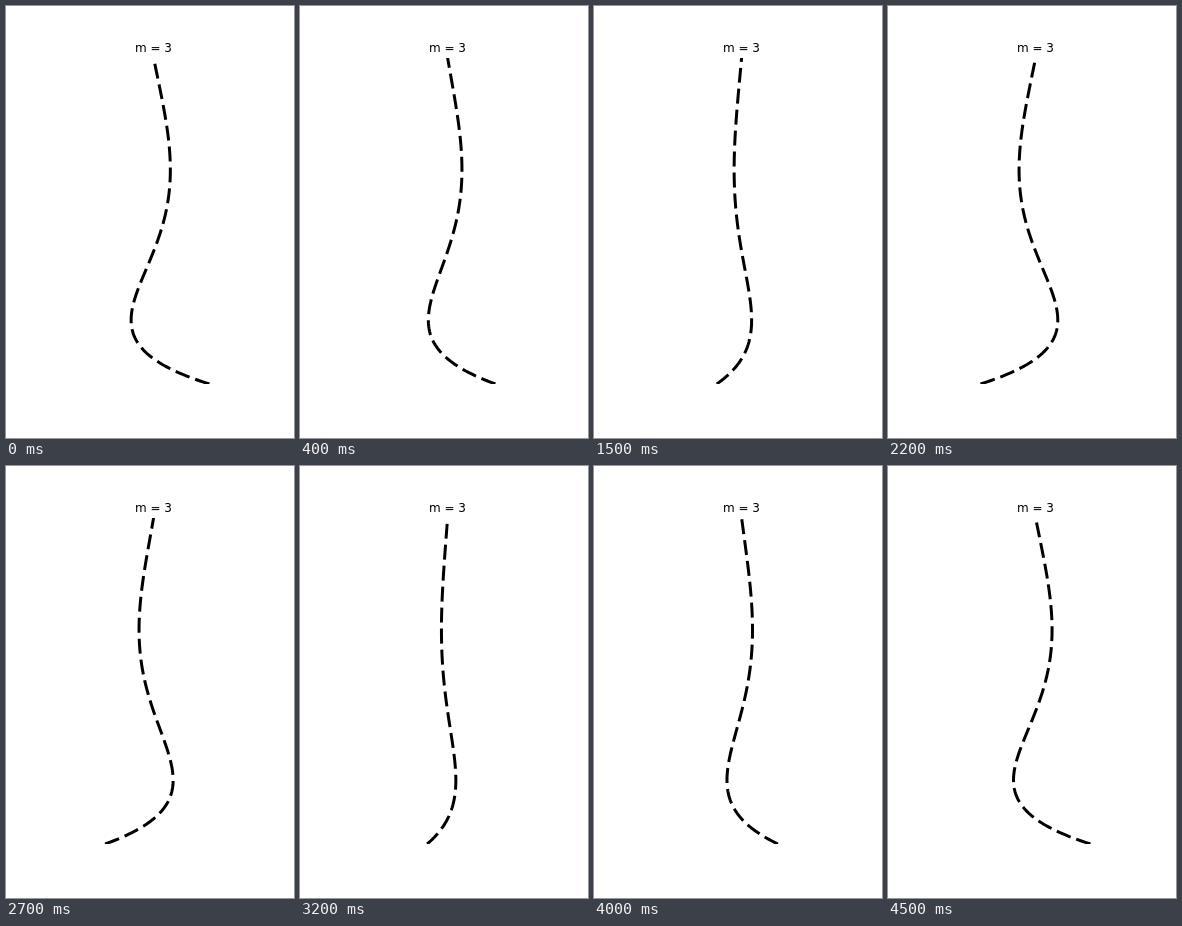
These frames come from a looping animation (288 px wide and 432 px high, 4600 ms). An HTML page:

```html
<!DOCTYPE html>
<html lang="en">
<head>
<meta charset="utf-8">
<title>Hanging chain, mode 3</title>
<style>
html, body { margin: 0; width: 100%; height: 100%; overflow: hidden; background: #fff; }
svg { display: block; }
text { font: 12px "DejaVu Sans", sans-serif; }
</style>
</head>
<body>
<svg width="288" height="432" viewBox="0 0 288 432">
  <clipPath id="axes"><rect x="36" y="52" width="223" height="326"/></clipPath>
  <text x="129" y="46">m = 3</text>
  <g clip-path="url(#axes)">
    <path id="chain" fill="none" stroke="#000" stroke-width="3" stroke-dasharray="15 6" stroke-linejoin="round"/>
  </g>
</svg>
<script>
const LOOP = 4600, STEP = 100, POINTS = 200;
const CENTER = 147.6, AMPLITUDE = 55.8, BOTTOM = 378, LENGTH = 326.16;
const ROOT = 8.653728;                      // third zero of J0
const OMEGA = ROOT / 2 * Math.sqrt(9.81);   // chain of 1 m
const SLOWDOWN = 10;

// Bessel function J0 by the midpoint rule
function j0(z) {
  const n = 24;
  let sum = 0;
  for (let k = 0; k < n; k++) sum += Math.cos(z * Math.sin(Math.PI * (k + 0.5) / n));
  return sum / n;
}

// Mode shape, from the free end up to the support
const shape = Array.from({ length: POINTS + 1 }, (_, i) => j0(ROOT * Math.sqrt(i / POINTS)));
const chain = document.getElementById("chain");

function draw(ms) {
  const a = AMPLITUDE * Math.cos(OMEGA * ms / 1000 / SLOWDOWN);
  const points = shape.map((u, i) =>
    (CENTER + a * u).toFixed(3) + "," + (BOTTOM - LENGTH * i / POINTS).toFixed(3));
  chain.setAttribute("d", "M" + points.join("L"));
}

const start = performance.now();
function tick() {
  const t = (performance.now() - start) % LOOP;
  draw(Math.floor(t / STEP) * STEP);
  requestAnimationFrame(tick);
}
tick();
</script>
</body>
</html>
```
